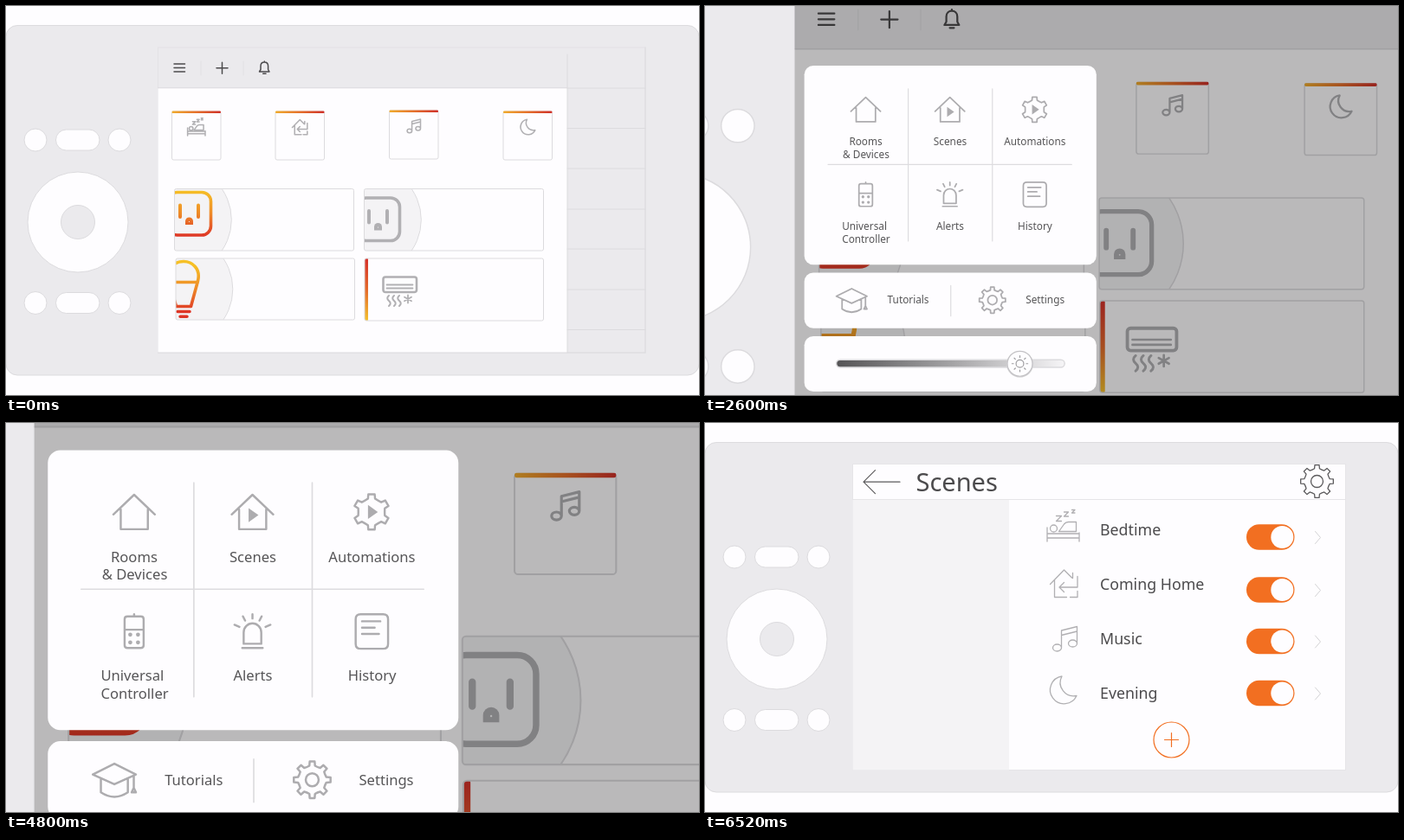
Animation, 800 px wide and 450 px high, one loop 6.56 s. Source, as an HTML page:

```html
<!DOCTYPE html>
<html lang="en">
<head>
<meta charset="utf-8">
<title>Smart home panel</title>
<style>
html, body { margin: 0; width: 100%; height: 100%; overflow: hidden; background: #fefdff; }
svg { display: block; width: 100vw; height: 100vh; }
text { font-family: "Noto Sans", "Open Sans", sans-serif; }
.line { fill: none; stroke-linecap: round; stroke-linejoin: round; }
</style>
</head>
<body>
<svg id="stage" viewBox="0 0 800 450"></svg>
<script>
const LOOP = 6560;
const WHITE = '#fefdff', BODY = '#ebeaed', EDGE = '#dcdbde', GRAY = '#b1b0b3', SOFT = '#f4f3f5';
const ORANGE = '#f26f21', DARK = '#4c4b4d';

// drawing helpers
const rect = (x, y, w, h, r, fill, stroke = 'none') =>
  `<rect x="${x}" y="${y}" width="${w}" height="${h}" rx="${r}" fill="${fill}" stroke="${stroke}"/>`;
const circle = (x, y, r, fill, stroke = 'none', w = 1) =>
  `<circle cx="${x}" cy="${y}" r="${r}" fill="${fill}" stroke="${stroke}" stroke-width="${w}"/>`;
const line = (d, stroke, w = 1) => `<path class="line" d="${d}" stroke="${stroke}" stroke-width="${w}"/>`;
const shape = (d, fill) => `<path d="${d}" fill="${fill}"/>`;
const text = (s, x, y, size, fill, anchor = 'start') =>
  `<text x="${x}" y="${y}" font-size="${size}" fill="${fill}" text-anchor="${anchor}">${s}</text>`;
const at = (x, y, k, body) => `<g transform="translate(${x} ${y}) scale(${k})">${body}</g>`;
const grad = (id, attrs, ...stops) => `<linearGradient id="${id}" ${attrs}>` +
  stops.map((c, i) => `<stop offset="${i / (stops.length - 1)}" stop-color="${c}"/>`).join('') + '</linearGradient>';

function gear(cx, cy, R, r, n) {
  const p = (rad, a) => `${(cx + rad * Math.sin(a)).toFixed(2)} ${(cy - rad * Math.cos(a)).toFixed(2)}`;
  const step = 2 * Math.PI / n;
  let d = '';
  for (let i = 0; i < n; i++) {
    const a = i * step;
    d += `${i ? 'L' : 'M'}${p(r, a - step * .25)}L${p(R, a - step * .17)}L${p(R, a + step * .17)}L${p(r, a + step * .25)}` +
      `Q${p(r * .95, a + step / 2)} ${p(r, a + step * .75)}`;
  }
  return d + 'Z';
}

// scene icons, centred on 0,0
const ring = (x, y, rx, ry = rx) => `M${x - rx} ${y}a${rx} ${ry} 0 1 0 ${2 * rx} 0a${rx} ${ry} 0 1 0 ${-2 * rx} 0`;
const ICON = {
  bed: 'M-18.5 2V18M18.5 8V18M-18.5 9H18.5M-18.5 14H18.5' + ring(-11, 3, 4) +
    'M-5 6.500L1-2Q3-4.500 6-4.500H15V6.500ZM-8-11.500h6l-6 6h6M1-16h5l-5 5h5M10-18.500h3.500l-3.500 3.500h3.500',
  home: 'M-16 1L0-15.500L9-6.500M-11-4V16H3M-5 4.500H15.500V-8M0-1L-5.500 4.500L0 10M10-12V-6M7 16H15.500V9',
  music: ring(-9, 10, 5, 4) + ring(9, 5, 5, 4) + 'M-4 10V-10L14-14.500V5M-4-4.500L14-9',
  moon: 'M-1.500-16A16 16 0 1 0 15.500 6.500A15.500 15.500 0 0 1-1.500-16Z'
};
const SCENES = [['bed', 'Bedtime'], ['home', 'Coming Home'], ['music', 'Music'], ['moon', 'Evening']];

function device() {
  const buttons = [155, 343.5].map(y => circle(34, y, 13, WHITE, EDGE) +
    rect(57.5, y - 12, 50.5, 24, 12, WHITE, EDGE) + circle(131, y, 13, WHITE, EDGE)).join('');
  return rect(0, 22.5, 800, 404.5, 13, BODY, EDGE) + buttons +
    circle(83, 250, 58, WHITE, EDGE) + circle(83, 250, 19.500, BODY, EDGE);
}

function outlet(x, y, color) {
  return at(x, y, 1, `<rect class="line" x="-24.500" y="-24.500" width="49.500" height="49.500" rx="10.500" stroke="${color}" stroke-width="3.600"/>` +
    line('M-10.500-9.500V4M10.500-9.500V4', color, 4) +
    shape('M-4.500 13V9a4.500 4.500 0 0 1 9 0V13Z', color) + circle(0, 9.500, .6, SOFT));
}

function tile(id, x, y, w, h, cx, body) {
  return `<clipPath id="${id}"><rect x="${x}" y="${y}" width="${w}" height="${h}" rx="2"/></clipPath>` +
    rect(x, y, w, h, 2, WHITE) + `<g clip-path="url(#${id})">` +
    (cx ? circle(cx, y + h / 2, 62.8, SOFT, EDGE) : '') + body + '</g>' + rect(x, y, w, h, 2, 'none', EDGE);
}

function homeScreen() {
  const rows = [95, 141.5, 188, 235, 281, 328, 374.5].map(y => `M648 ${y}H738`).join('');
  const cards = [[191.5, 122], [311, 122], [442.5, 121], [574, 122]].map(([x, y], i) =>
    rect(x, y, 56.5, 56, 2, WHITE, EDGE) + rect(x, y - .5, 56.5, 2.6, 1, 'url(#bar)') +
    at(x + 28.3, y + 18, .55, line(ICON[SCENES[i][0]], GRAY, 2.8))).join('');
  const bulb = at(205, 327, 1,
    line('M-17-9C-21-24-10-31.500 0-31.500S20-23 16.500-9L8.500 20.500H-8.500L-17-9', 'url(#warm)', 3.600) +
    line('M-20-7.500H16M-7 26.500H7M-4 32.300H4', 'url(#warm)', 3.500));
  const wave = x => `M${x} 335q-3.500 3 0 6t0 6`;
  const cooler = rect(414, 292, 4, 72, 1, 'url(#side)') +
    line('M438 313.500h33.500a2.500 2.500 0 0 1 2.500 2.500v12.500a2.500 2.500 0 0 1-2.500 2.500h-33.500a2.500 2.500 0 0 1-2.500-2.500v-12.500a2.500 2.500 0 0 1 2.500-2.500', GRAY, 2.6) +
    line('M439.500 322.500H469.500M439.500 326.500H469.500', GRAY, 1.8) +
    line(wave(442) + wave(448) + wave(454), GRAY, 2) +
    line('M464 334.500v9M460 336.800l8 4.500M468 336.800l-8 4.500', GRAY, 1.8);
  return rect(175.5, 48, 562.5, 353, 0, BODY, '#e3e2e5') +
    rect(175.5, 95, 472.5, 306, 0, WHITE) + line('M175.500 94.800H648M175.500 401H738M738 48V401', EDGE) +
    line('M648 56V401' + rows, EDGE) + line('M225 64V80M274 64V80', '#e1e0e3') +
    line('M194 67H206.500M194 71.500H206.500M194 76H206.500M243 71.700H256M249.500 65.200V78.200', DARK, 1.5) +
    line('M292.500 76H304L302.600 73.500V69.500C302.600 63.500 294 63.500 294 69.500V73.500ZM298.300 64.800V64M296.700 78.300H300', DARK, 1.5) +
    cards +
    tile('t1', 194.5, 211.5, 207, 71.5, 197.500, outlet(211.5, 240, 'url(#warm)')) +
    tile('t2', 413.5, 211.5, 207, 71.5, 416.500, outlet(429.5, 246.5, GRAY)) +
    tile('t3', 196, 292, 206.5, 71, 199, bulb) +
    tile('t4', 414, 292, 206.5, 72, 0, cooler);
}

function menu() {
  const G = '#adacaf', INK = '#565557';
  const house = x => `M${x - 29.5} 102L${x} 74L${x + 29.5} 102M${x - 19} 95V123H${x + 19.5}V95`;
  const play = (x, y) => shape(`M${x} ${y - 10}V${y + 10}L${x + 14} ${y}Z`, G);
  // icon coordinates are those of the zoomed-in view
  const icons = `<g transform="scale(${1 / ZOOM.s}) translate(${-ZOOM.x} ${-ZOOM.y})">` +
    line(house(133.500) + house(301.500) + gear(470.5, 98.5, 25.500, 19.500, 6) +
      'M124 247h19q4 0 4 4v37q0 4-4 4h-19q-4 0-4-4v-37q0-4 4-4M120 266h27M133.500 244v3' +
      'M289 286v-16a12.500 13 0 0 1 25 0v16zM287 292h29M301.500 244v6M288 247l3 6M314.500 247l-3 6M276 259l7 3M327 259l-7 3' +
      'M455 244h32q7 0 7 7v35q0 7-7 7h-32q-7 0-7-7v-35q0-7 7-7M457 254h26M457 263h18M457 272h24', G, 3) +
    [128, 139].map(x => circle(x, 273, 2.9, G) + circle(x, 284, 2.9, G)).join('') +
    play(296, 103) + play(465.5, 98.5) + '</g>';
  let rays = '';
  for (let i = 0; i < 8; i++) {
    const c = Math.cos(i * Math.PI / 4), s = Math.sin(i * Math.PI / 4);
    rays += `M${351.5 + 5 * c} ${341.3 + 5 * s}L${351.5 + 6.2 * c} ${341.3 + 6.2 * s}`;
  }
  const labels = [['Rooms', 231, 170], ['&amp; Devices', 231.3, 180], ['Scenes', 297, 170], ['Automations', 363.2, 170],
    ['Universal', 230, 236.4], ['Controller', 231.3, 246.4], ['Alerts', 297, 236.4], ['History', 363.3, 236.4],
    ['Tutorials', 264.2, 294.3], ['Settings', 371.2, 294.3]];
  return rect(183, 107.8, 228.3, 156, 7, WHITE) + rect(183, 270, 228.3, 43.5, 7, WHITE) + rect(183, 319.8, 228.3, 43.4, 7, WHITE) +
    line('M264.200 126V245.300M330 126V245.300M201.500 185.300H392M297.500 280V304', '#dddcdf', .8) + icons +
    line('M208 288.500L220 282.500L232 288.500L220 294ZM212.500 291V298.500Q220 303.500 227.500 298.500V291M230.800 289.500V296M230.800 296l-1.200 2.500h2.400z', G, 1.2) +
    line(gear(330, 291.5, 10.3, 8, 8), G, 1.2) + circle(330, 291.5, 3.6, 'none', G, 1.2) +
    rect(208, 338.2, 178.5, 6, 3, 'url(#slide)', '#dcdbde') + circle(351.5, 341.8, 10.4, '#d5d4d7') +
    circle(351.5, 341.3, 9.8, WHITE, '#c3c2c5', .8) + circle(351.5, 341.3, 3, 'none', '#9d9c9f', .8) + line(rays, '#9d9c9f', .8) +
    labels.map(([s, x, y]) => text(s, x, y, 8, INK, 'middle')).join('');
}

function sceneList() {
  const iconPos = [[413.5, 119], [414.5, 185.5], [415.5, 250], [413.5, 309]];
  const switchY = [132, 193, 252.5, 312.5];
  const rows = SCENES.map(([icon, name], i) => {
    const y = switchY[i];
    return at(...iconPos[i], 1, line(ICON[icon], GRAY, 1.3)) + text(name, 456, 130 + 63 * i, 17.8, DARK) +
      rect(625, y - 14.7, 55.5, 29.4, 14.7, ORANGE) + circle(666.3, y, 13, WHITE) +
      line(`M704.500 ${y - 6.5}l6 7l-6 7`, '#d3d2d5', 1);
  }).join('');
  return rect(170.5, 47.5, 569, 354, 0, WHITE, '#e6e5e8') + rect(170.5, 88.5, 180.5, 313, 0, SOFT) +
    line('M170.500 88.500H739.500', '#e6e5e8') + line('M225 68.200H183M196.500 54.700L183 68.200L196.500 81.700', '#5b5a5c', 1.2) +
    text('Scenes', 243.5, 79, 29, DARK) +
    line(gear(706.5, 67.5, 19, 15, 8), '#5b5a5c', 1.3) + circle(706.5, 67.5, 7, 'none', '#5b5a5c', 1.3) + rows +
    circle(538.5, 366.5, 20.5, 'none', ORANGE, 1.2) + line('M530.500 366.500h16M538.500 358.500v16', ORANGE, 1.2);
}

const ZOOM = { s: 2.553, x: -456.2, y: -264.7 };
const svg = document.getElementById('stage');
svg.innerHTML = '<defs>' +
  grad('warm', 'gradientUnits="userSpaceOnUse" x1="0" y1="-27" x2="0" y2="27"', '#f6c026', '#ee8a28', '#de3426') +
  grad('bar', '', '#f0ac2d', '#e5702b', '#cf3029') +
  grad('side', 'x1="0" y1="0" x2="0" y2="1"', '#d6302a', '#e46a2a', '#f4c02c') +
  grad('slide', '', '#555456', '#a3a2a4', '#f6f5f7') + '</defs>' +
  `<g id="world">${rect(-10, -10, 820, 470, 0, WHITE)}${device()}${homeScreen()}` +
  `<g id="menu">${rect(175.5, 48, 562, 352.5, 0, 'rgba(0,0,0,.27)')}${menu()}</g></g>` +
  `<g id="list">${sceneList()}</g>` +
  `<g id="cursor">${circle(0, 0, 25, '#dddcde')}${circle(0, 0, 18.8, '#f2f1f3')}</g>`;
const [world, menuEl, list, cursor] = ['world', 'menu', 'list', 'cursor'].map(id => document.getElementById(id));

const ramp = (t, a, b) => Math.min(1, Math.max(0, (t - a) / (b - a)));
const smooth = u => u * u * (3 - 2 * u);
const glide = u => .6 * u + .4 * smooth(u);
const show = (el, o) => { el.setAttribute('opacity', o); el.style.display = o > 0 ? '' : 'none'; };

const TAPS = [
  { shown: [340, 500], move: [640, 1220], hide: [1280, 1440], from: [371, 239], to: [200, 72], k: 1 },
  { shown: [2920, 3150], move: [3480, 4030], hide: [4100, 4340], from: [641, 309], to: [300.3, 97], k: 1.36 }
];

function draw(t) {
  const p = smooth(ramp(t, 2380, 2980)) - smooth(ramp(t, 4580, 5180));
  const q = p + .16 * p * (1 - p); // the pan runs slightly ahead of the scale
  world.setAttribute('transform', `translate(${ZOOM.x * q} ${ZOOM.y * q}) scale(${1 + (ZOOM.s - 1) * p})`);
  show(menuEl, smooth(ramp(t, 1320, 1660)));
  show(list, smooth(ramp(t, 5190, 5480)));

  const tap = TAPS[t < 2000 ? 0 : 1];
  const u = glide(ramp(t, ...tap.move));
  const [x, y] = tap.from.map((v, i) => v + (tap.to[i] - v) * u);
  cursor.setAttribute('transform', `translate(${x} ${y}) scale(${tap.k})`);
  show(cursor, ramp(t, ...tap.shown) * (1 - ramp(t, ...tap.hide)));
}

const start = performance.now();
function tick() {
  draw((performance.now() - start) % LOOP);
  requestAnimationFrame(tick);
}
tick();
</script>
</body>
</html>
```
